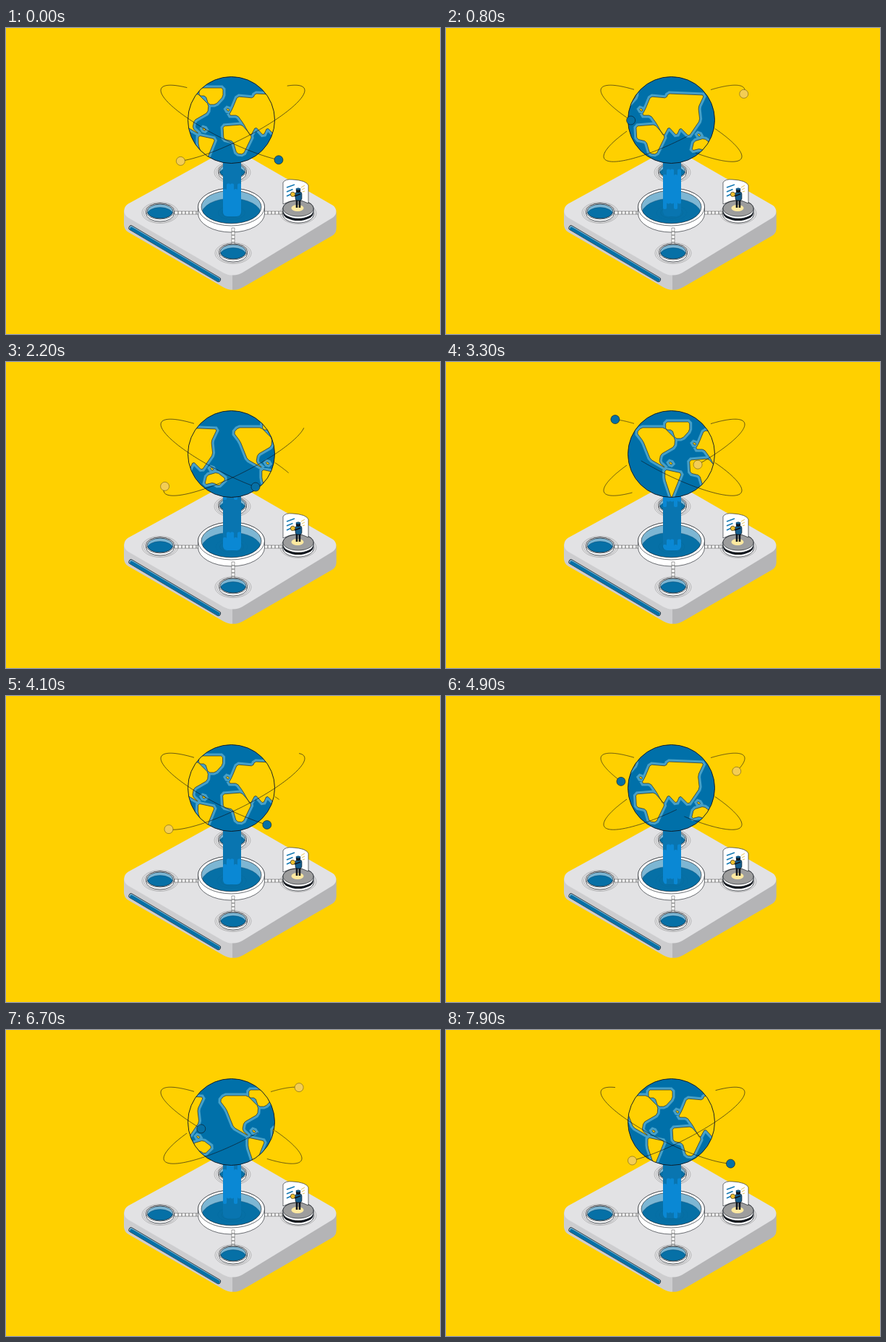
These frames come from a looping animation (600x424 px, 8 s). An HTML page with a canvas:

```html
<!DOCTYPE html>
<html lang="en">
<head>
<meta charset="utf-8">
<title>Globe fountain</title>
<style>
html, body { margin: 0; width: 100%; height: 100%; overflow: hidden; background: #ffd000; }
canvas { display: block; width: 600px; height: 424px; }
</style>
</head>
<body>
<canvas id="stage"></canvas>
<script>
const LOOP = 8000, STEP = 100;
const INK = '#10151c', YELLOW = '#ffd000', BLUE = '#0670a6', PALE = '#7db6d3', BRIGHT = '#0a88d4';
const GLOBE = { x: 311.5, y: 127.5, r: 60 };
const MAP_WIDTH = 190, MAP_TURN = 4090;
const ORBIT_TIME = 2000, LINE_SHARE = 0.7;
const FALL_TIME = 1000;

const canvas = document.getElementById('stage');
const ctx = canvas.getContext('2d');
const scale = window.devicePixelRatio || 1;
canvas.width = 600 * scale;
canvas.height = 424 * scale;

const frac = n => n - Math.floor(n);

function paint(path, fill, line, width = 0.6) {
  if (fill) { ctx.fillStyle = fill; ctx.fill(path); }
  if (line) { ctx.strokeStyle = line; ctx.lineWidth = width; ctx.stroke(path); }
}

function oval(x, y, rx, ry = rx) {
  const p = new Path2D();
  p.ellipse(x, y, rx, ry, 0, 0, Math.PI * 2);
  return p;
}

function segment(x1, y1, x2, y2) {
  const p = new Path2D();
  p.moveTo(x1, y1);
  p.lineTo(x2, y2);
  return p;
}

// Upright cylinder: an oval swept down by h
function drum(x, y, rx, ry, h) {
  const p = new Path2D();
  p.ellipse(x, y, rx, ry, 0, Math.PI, 0);
  p.ellipse(x, y + h, rx, ry, 0, 0, Math.PI);
  p.closePath();
  return p;
}

function inside(shape, drawer) {
  ctx.save();
  ctx.clip(shape);
  drawer();
  ctx.restore();
}

// Coast through a few key points, every corner cut off
function addCoast(path, ...pts) {
  pts.forEach(([x, y], i) => {
    const ends = [pts.at(i - 1), pts[(i + 1) % pts.length]];
    ends.forEach(([ex, ey], side) => {
      const cut = Math.min(0.3, 2.2 / Math.hypot(ex - x, ey - y));
      const px = x + (ex - x) * cut, py = y + (ey - y) * cut;
      if (i || side) path.lineTo(px, py); else path.moveTo(px, py);
    });
  });
  path.closePath();
}

const land = new Path2D();
// The Americas
addCoast(land, [227, 98], [233, 91], [265, 91], [280, 106], [279, 117], [260, 128], [258, 139], [267, 147], [246, 135], [236, 110]);
addCoast(land, [266, 149], [289, 154], [275, 189], [266, 162]);
// Greenland
addCoast(land, [267, 83], [300, 83], [300, 95], [290, 106], [280, 106], [276, 94], [267, 94]);
// Europe and Asia
addCoast(land, [313, 112], [320, 95], [342, 97], [344, 91], [394, 93], [386, 110], [388, 128], [373, 150], [361, 138], [356, 149], [345, 137], [338, 150], [328, 132], [320, 121], [308, 121]);
// Africa
addCoast(land, [300, 136], [326, 134], [340, 150], [328, 175], [319, 174], [314, 157], [301, 154]);
// Australia
addCoast(land, [377, 170], [380, 157], [394, 153], [406, 162], [396, 172], [389, 167]);
// Islands
for (const [x, y] of [[274, 140], [307, 113], [387, 148]]) addCoast(land, [x - 3, y - 2], [x + 3, y], [x, y + 3]);

function drawGlobe(t) {
  const ball = oval(GLOBE.x, GLOBE.y, GLOBE.r);
  const shift = -frac(t / MAP_TURN) * MAP_WIDTH;
  paint(ball, '#0070a9');
  inside(ball, () => {
    ctx.translate(shift - MAP_WIDTH, 0);
    for (let k = 0; k < 3; k++) {
      paint(land, null, '#46a0c8', 7);
      paint(land, YELLOW, INK, 0.6);
      ctx.translate(MAP_WIDTH, 0);
    }
  });
  paint(ball, null, INK, 0.9);
}

// Open path around the globe, measured by length
function makeOrbit(cx, flip, from, to) {
  const pts = [], n = 240;
  let length = 0;
  for (let i = 0; i <= n; i++) {
    const u = (from + (to - from) * i / n) * Math.PI / 180;
    const x = cx + flip * 97.5 * Math.cos(u);
    const y = 132.2 + 53 * Math.cos(u - 0.5306);
    if (i) length += Math.hypot(x - pts[i - 1].x, y - pts[i - 1].y);
    pts.push({ x, y, d: length });
  }
  return { pts, length };
}

function pointAt(orbit, share) {
  const d = share * orbit.length;
  const i = Math.max(1, orbit.pts.findIndex(p => p.d >= d - 1e-6));
  const a = orbit.pts[i - 1], b = orbit.pts[i], k = (d - a.d) / (b.d - a.d);
  return { x: a.x + (b.x - a.x) * k, y: a.y + (b.y - a.y) * k };
}

function strokePart(orbit, a, b) {
  const p = new Path2D();
  for (let i = 0; i <= 120; i++) {
    const q = pointAt(orbit, a + (b - a) * i / 120);
    p.lineTo(q.x, q.y);
  }
  paint(p, null, INK, 0.65);
}

function drawLine(orbit, start) {
  const a = frac(start), b = a + LINE_SHARE;
  strokePart(orbit, a, Math.min(b, 1));
  if (b > 1) strokePart(orbit, 0, b - 1);
}

const blueOrbit = makeOrbit(311.5, 1, -51.6, 238.1);
const goldOrbit = makeOrbit(315.5, -1, 238.8, -47.8);

function drawOrbits(t) {
  const blue = frac((t - 1460) / ORBIT_TIME), gold = frac((t - 458) / ORBIT_TIME);
  drawLine(blueOrbit, blue);
  drawLine(goldOrbit, gold - LINE_SHARE);
  const b = pointAt(blueOrbit, blue), g = pointAt(goldOrbit, gold);
  paint(oval(b.x, b.y, 6), BLUE, INK);
  paint(oval(g.x, g.y, 6), '#f3cd55', '#6b5a1c');
}

// One layer of the rounded slab, lowered by drop
function tile(drop) {
  const p = new Path2D();
  p.moveTo(232, 209 + drop);
  p.arcTo(312, 165 + drop, 466, 254 + drop, 27);
  p.arcTo(466, 254 + drop * 1.25, 314, 347 + drop, 10);
  p.arcTo(314, 347 + drop, 152, 253 + drop, 27);
  p.arcTo(152, 253 + drop, 312, 165 + drop, 11);
  p.closePath();
  return p;
}

function drawSlab() {
  const sides = ctx.createLinearGradient(312.5, 0, 313.5, 0);
  sides.addColorStop(0, '#cdcdcf');
  sides.addColorStop(1, '#b4b4b6');
  for (let drop = 20; drop > 0; drop--) paint(tile(drop), sides);
  paint(tile(0), '#e2e2e4');
  ctx.lineCap = 'round';
  const slot = segment(173, 277, 293.5, 348.5);
  paint(slot, null, INK, 7);
  paint(slot, null, PALE, 5.6);
  paint(segment(173.4, 278, 293.5, 349), null, BLUE, 4.4);
  ctx.lineCap = 'butt';
}

function drawPipe(x, y, w, h) {
  const p = new Path2D(), flat = w > h;
  p.rect(x, y, w, h);
  for (let d = 5; d < Math.max(w, h); d += 5) {
    if (flat) p.rect(x + d, y, 0, h); else p.rect(x, y + d, w, 0);
  }
  paint(p, '#fff', '#444', 0.5);
}

function drawPool(x, y, rx, ry, rim, wall, depth) {
  const ix = rx - rim, iy = ry - rim * 0.7, inner = oval(x, y, ix, iy);
  paint(drum(x, y, rx, ry, wall), '#fff', INK);
  paint(oval(x, y, rx, ry), '#fff', INK);
  paint(inner, PALE);
  inside(inner, () => paint(oval(x, y + depth, ix, iy), BLUE, '#0a4f78', 0.5));
  paint(inner, null, INK);
}

function groundRings(x, y) {
  for (const r of [25, 22.5]) paint(oval(x, y, r, r * 0.58), null, '#888', 0.5);
}

function smallPool(x, y) {
  groundRings(x, y + 1);
  drawPool(x, y - 1, 19.5, 11, 1.6, 3, 4.5);
}

function drawWater(t) {
  for (let i = 0; i < 3; i++) {
    const k = frac(t / FALL_TIME + i / 3);
    ctx.globalAlpha = 0.4 * (1 - k);
    paint(oval(312, 256, 8 + 16 * k, 4 + 8 * k), null, '#0a4f78');
  }
  ctx.globalAlpha = 1;
  const fall = new Path2D();
  fall.roundRect(300, 180, 25, 81, [0, 0, 6, 6]);
  inside(fall, () => {
    paint(fall, '#0975b0');
    ctx.fillStyle = BRIGHT;
    for (let i = 0; i < 5; i++) {
      for (let k = -1; k < 1; k++) {
        const y = 218 + 100 * (frac(t / FALL_TIME) + k) + 5 * Math.cos(i * 2.1);
        const p = new Path2D();
        p.roundRect(300 + i * 5, y, 5.1, 48, 2);
        ctx.fill(p);
      }
    }
  });
}

function drawReader() {
  paint(oval(403, 249.5, 8.5, 4.5), '#ffe9a0');
  for (const x of [402, 406]) paint(segment(x, 237, x, 249), null, INK, 2.6);
  const coat = new Path2D();
  coat.roundRect(400, 227, 9, 12, 3);
  paint(coat, '#145d8c', INK);
  paint(oval(404, 225, 3.2), INK);
  paint(oval(404, 223, 3.4, 1.6), '#145d8c');
  paint(oval(396.5, 230.5, 3.2), '#f0c02c', INK);
  paint(segment(407, 230, 399, 233), null, INK, 1.6);
}

function drawStand() {
  groundRings(404, 257);
  paint(drum(404, 250, 21, 11, 9), '#fff', INK);
  paint(drum(404, 250, 21, 11, 6), INK);
  paint(drum(404, 250, 21, 11, 3), '#fff', INK);
  paint(oval(404, 250, 21, 11), '#9d9d9d', INK);
  const screen = new Path2D('M383 244 V214 Q386 209 396 210 Q415 211 418 218 V243 Q402 234 383 244 Z');
  paint(screen, '#fff', INK);
  for (let i = 0; i < 3; i++) {
    paint(segment(388, 221 + i * 6, 399 - i * 2.5, 217 + i * 6.6), null, '#1478b2', 1.6);
    paint(segment(408 + i, 221 + i * 3, 413, 218 + i * 4), null, '#d9a91c', 0.7);
  }
  drawReader();
}

function draw(t) {
  ctx.setTransform(scale, 0, 0, scale, 0, 0);
  ctx.fillStyle = YELLOW;
  ctx.fillRect(0, 0, 600, 424);
  drawSlab();
  smallPool(313, 199);
  smallPool(213, 255);
  smallPool(314, 311);
  drawPipe(233, 254, 33, 4);
  drawPipe(357, 254, 27, 4);
  drawPool(311.5, 248, 46, 26, 4.5, 9, 11);
  drawPipe(312, 277, 4, 22);
  drawWater(t);
  drawStand();
  drawGlobe(t);
  drawOrbits(t);
}

function tick() {
  draw(Math.floor(performance.now() / STEP) * STEP % LOOP);
  requestAnimationFrame(tick);
}
tick();
</script>
</body>
</html>
```
